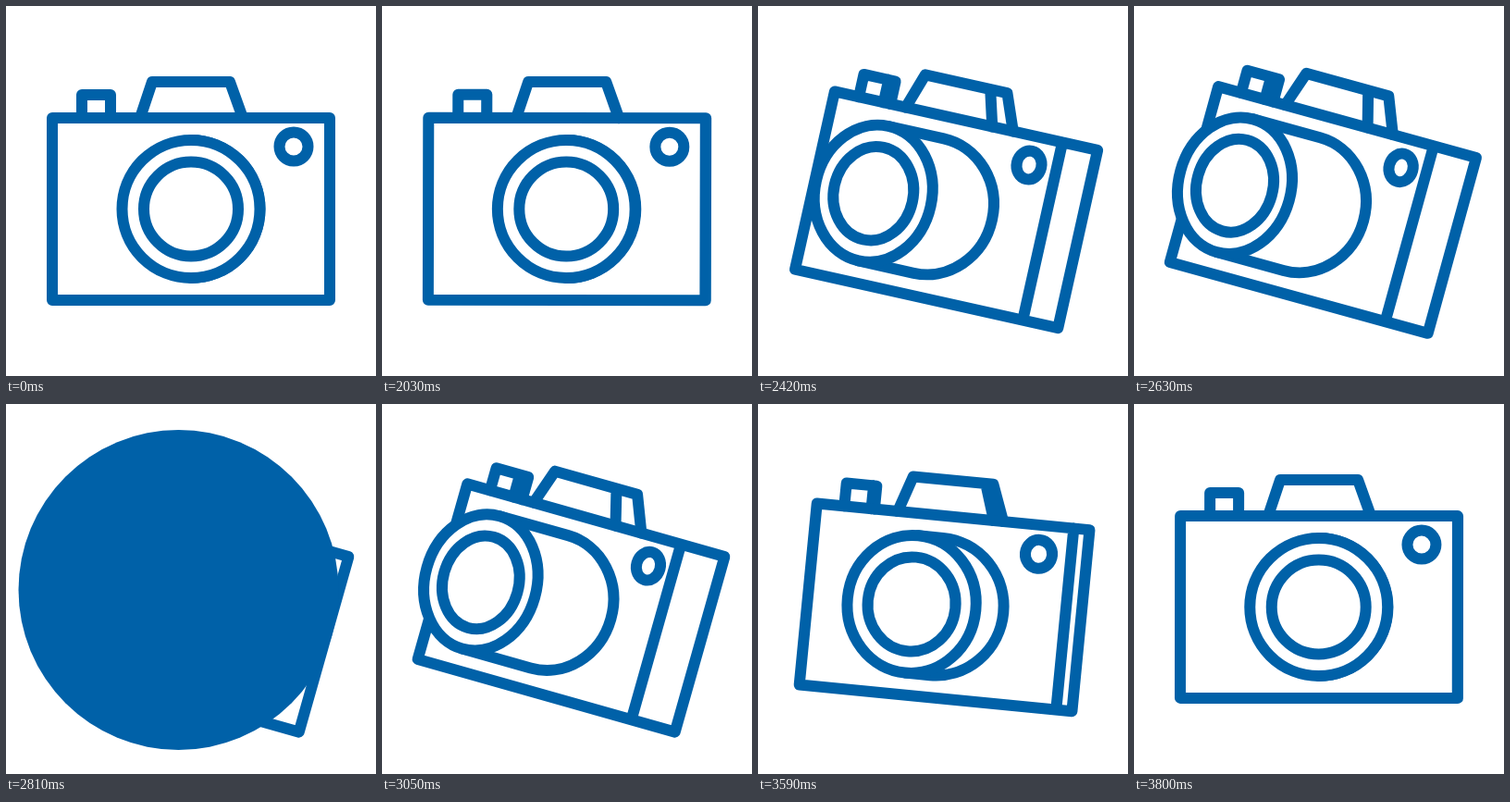
Write an HTML page that moves like this. It is 400 px wide and 400 px high and loops after 3.83 s.

```html
<!DOCTYPE html>
<html lang="en">
<head>
<meta charset="utf-8">
<title>Camera</title>
<style>
  html, body { margin: 0; width: 100%; height: 100%; overflow: hidden; background: #fff; }
  svg { display: block; width: 100vw; height: 100vh; }
  #camera { fill: none; stroke: #0061a8; stroke-width: 12; stroke-linecap: round; stroke-linejoin: round; }
  #camera .solid { fill: #fff; }
  #flash { fill: #0061a8; }
</style>
</head>
<body>
<svg viewBox="0 0 400 400">
  <g id="camera">
    <path id="button"/>
    <path id="finder"/>
    <path id="body"/>
    <ellipse id="dial"/>
    <path id="barrel" class="solid"/>
    <ellipse id="rim" class="solid"/>
    <ellipse id="glass"/>
  </g>
  <circle id="flash" cx="186.5" cy="201" r="0"/>
</svg>
<script>
const LOOP = 3830, STEP = 30;
const TURN = { start: 1990, back: 3045, length: 780 };
const FLASH = { start: 2640, full: 2800, fade: 2840, end: 2990, radius: 173 };
const TOP = -98.5, BOTTOM = 98.5, LENS = 74.5;

const el = id => document.getElementById(id);
const clamp = v => Math.min(1, Math.max(0, v));
const smooth = v => (1 - Math.cos(Math.PI * clamp(v))) / 2;

// Cubic bezier (.35, 0, .3, 1), solved by bisection
function ease(x) {
  if (x <= 0 || x >= 1) return clamp(x);
  let lo = 0, hi = 1;
  for (let i = 0; i < 24; i++) {
    const s = (lo + hi) / 2, q = 1 - s;
    if (1.05 * s * q * q + 0.9 * s * s * q + s * s * s < x) lo = s; else hi = s;
  }
  return lo * lo * (3 - 2 * lo);
}

function turnAt(t) {
  if (t < TURN.back) return ease((t - TURN.start) / TURN.length);
  return ease((TURN.back + TURN.length - t) / TURN.length);
}

function flashAt(t) {
  const grow = smooth((t - FLASH.start) / (FLASH.full - FLASH.start));
  const shrink = smooth((t - FLASH.fade) / (FLASH.end - FLASH.fade));
  return FLASH.radius * (grow - shrink);
}

function setEllipse(id, cx, cy, rx, ry) {
  const attrs = { cx, cy, rx, ry };
  for (const name in attrs) el(id).setAttribute(name, attrs[name]);
}

function pose(p) {
  const mix = (a, b) => a + (b - a) * p;
  const path = (id, d) => el(id).setAttribute('d', d);
  el('camera').setAttribute('transform',
    `translate(${mix(200, 204.5)} ${mix(219.5, 220.5)}) rotate(${mix(0, 15.8)})`);

  const left = mix(-150, -144.5), right = -left, edge = mix(150, 95.5);
  path('body', `M${left} ${TOP}H${right}V${BOTTOM}H${left}ZM${edge} ${TOP}V${BOTTOM}`);

  const b0 = mix(-118, -119), b1 = mix(-87, -92.5), b2 = mix(-87, -83);
  path('button', `M${b0} ${TOP}V-123.5H${b2}V${TOP}M${b1} ${TOP}V-123.5`);

  const peak = -137.5, ridge = mix(42, 12);
  path('finder', `M${mix(-55, -70)} ${TOP}L${mix(-42, -57)} ${peak}H${mix(42, 35.5)}` +
    `L${mix(56, 51)} ${TOP}M${ridge} ${peak}L${mix(56, 22)} ${TOP}`);

  setEllipse('dial', mix(111, 68), mix(-67.5, -66.3), mix(15.5, 12.9), 15.5);

  const base = mix(0, -24.5), front = mix(0, -101.5);
  path('barrel', `M${front} ${-LENS}H${base}A${mix(LENS, 69)} ${LENS} 0 0 1 ${base} ${LENS}H${front}`);
  setEllipse('rim', front, 0, mix(LENS, 60.5), LENS);
  setEllipse('glass', front, 0, mix(51, 41), 51);
}

function draw(now) {
  const t = Math.floor((now % LOOP + 10) / STEP) * STEP - 10;
  pose(turnAt(t));
  el('flash').setAttribute('r', flashAt(t));
}

const began = performance.now();
function tick() {
  draw(performance.now() - began);
  requestAnimationFrame(tick);
}
tick();
</script>
</body>
</html>
```
